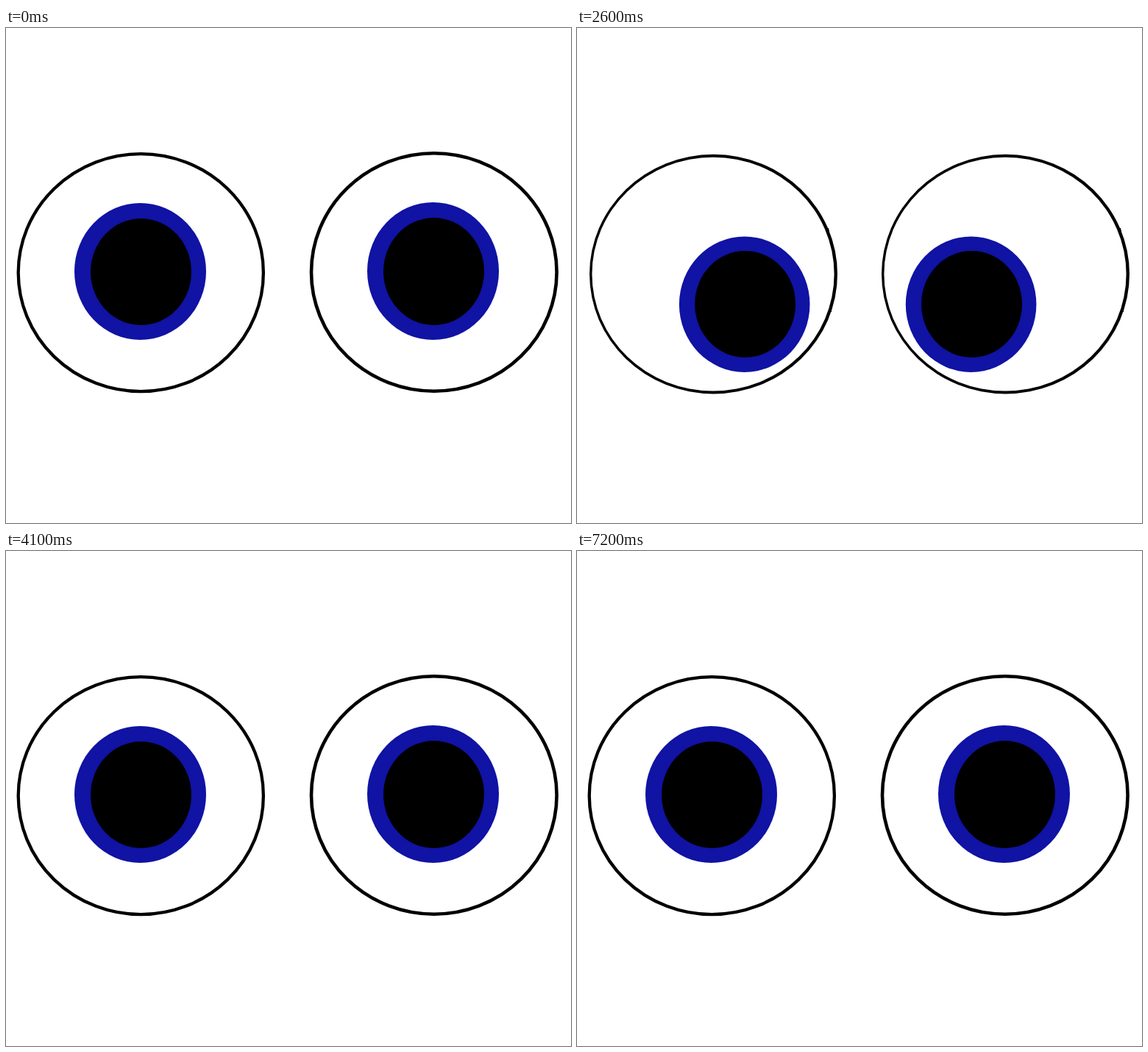
Animation, 768 px wide and 673 px high, one loop 8 s. Source, as an HTML page:

```html
<!DOCTYPE html>
<html lang="en">
<head>
<meta charset="utf-8">
<title>Googly eyes</title>
<style>
  html, body { margin: 0; width: 100%; height: 100%; overflow: hidden; background: #fff; }
  svg { display: block; width: 768px; height: 673px; }
  .iris { fill: #1013a3; }
  .ring { fill: #fff; stroke: #000; stroke-width: 4.3; }
</style>
</head>
<body>
<svg viewBox="0 0 768 673">
  <defs>
    <g id="ball">
      <ellipse cx="185.5" cy="334.6" rx="168.5" ry="162.8"/>
      <path d="M337 272h5l1 5h-5zM342 382h4v4h-5z"/>
      <ellipse cx="185" cy="334.6" rx="164.6" ry="158.9" fill="#fff"/>
    </g>
    <g id="iris">
      <ellipse class="iris" cx="-.4" cy=".3" rx="88.8" ry="92.2"/>
      <ellipse cx=".5" rx="68.5" ry="72.5"/>
    </g>
  </defs>

  <g id="rest">
    <ellipse class="ring" cx="183.3" cy="332.7" rx="166.6" ry="161.5"/>
    <ellipse class="iris" cx="182.5" cy="331" rx="89.5" ry="93"/>
    <ellipse cx="183.5" cy="331.5" rx="68.5" ry="72.5"/>
    <ellipse class="ring" cx="581.8" cy="332" rx="166.8" ry="161.7" style="stroke-width:4.6"/>
    <ellipse class="iris" cx="580.5" cy="330.5" rx="89.5" ry="93.5"/>
    <ellipse cx="581.5" cy="331" rx="68.5" ry="73"/>
  </g>

  <g id="look" visibility="hidden">
    <use href="#ball"/>
    <use href="#ball" x="397"/>
    <use href="#iris" id="left"/>
    <use href="#iris" id="right"/>
  </g>
</svg>
<script>
const LOOP = 8000, STEP = 100, TURN = Math.PI / 4;
const byId = id => document.getElementById(id);
const [rest, look, left, right] = ["rest", "look", "left", "right"].map(byId);

// start time and pose
const poses = [
  [0, "rest"], [500, "west"], [700, "rest"], [800, "east"], [1000, "rest"],
  [1100, "west"], [1300, "rest"], [1400, "apart"], [2300, "roll"], [4100, "rest"],
  [5100, "west"], [6100, "rest"], [6200, "east"], [7200, "rest"]
];

function place(iris, cx, r, angle) {
  const s = Math.sin(angle);
  const x = cx + r * Math.cos(angle);
  const y = 334.5 + s * (s > 0 ? 57.8 : 53.3);
  iris.setAttribute("transform", `translate(${x.toFixed(1)} ${y.toFixed(1)})`);
}

function aim(a, b) {
  place(left, 186.2, 59.2, a);
  place(right, 579.5, 61.5, b);
}

function draw(t) {
  const [start, pose] = poses.findLast(p => p[0] <= t);
  const resting = pose === "rest";
  rest.setAttribute("visibility", resting ? "visible" : "hidden");
  look.setAttribute("visibility", resting ? "hidden" : "visible");
  if (pose === "west") aim(Math.PI, Math.PI);
  if (pose === "east") aim(0, 0);
  if (pose === "apart") aim(Math.PI, 0);
  if (pose === "roll") {
    // two mirrored turns in eighths
    const a = Math.min(16, Math.floor((t - start) / STEP)) * TURN;
    aim(Math.PI - a, a);
  }
}

const begin = performance.now();
function tick() {
  draw((performance.now() - begin) % LOOP);
  requestAnimationFrame(tick);
}
tick();
</script>
</body>
</html>
```
